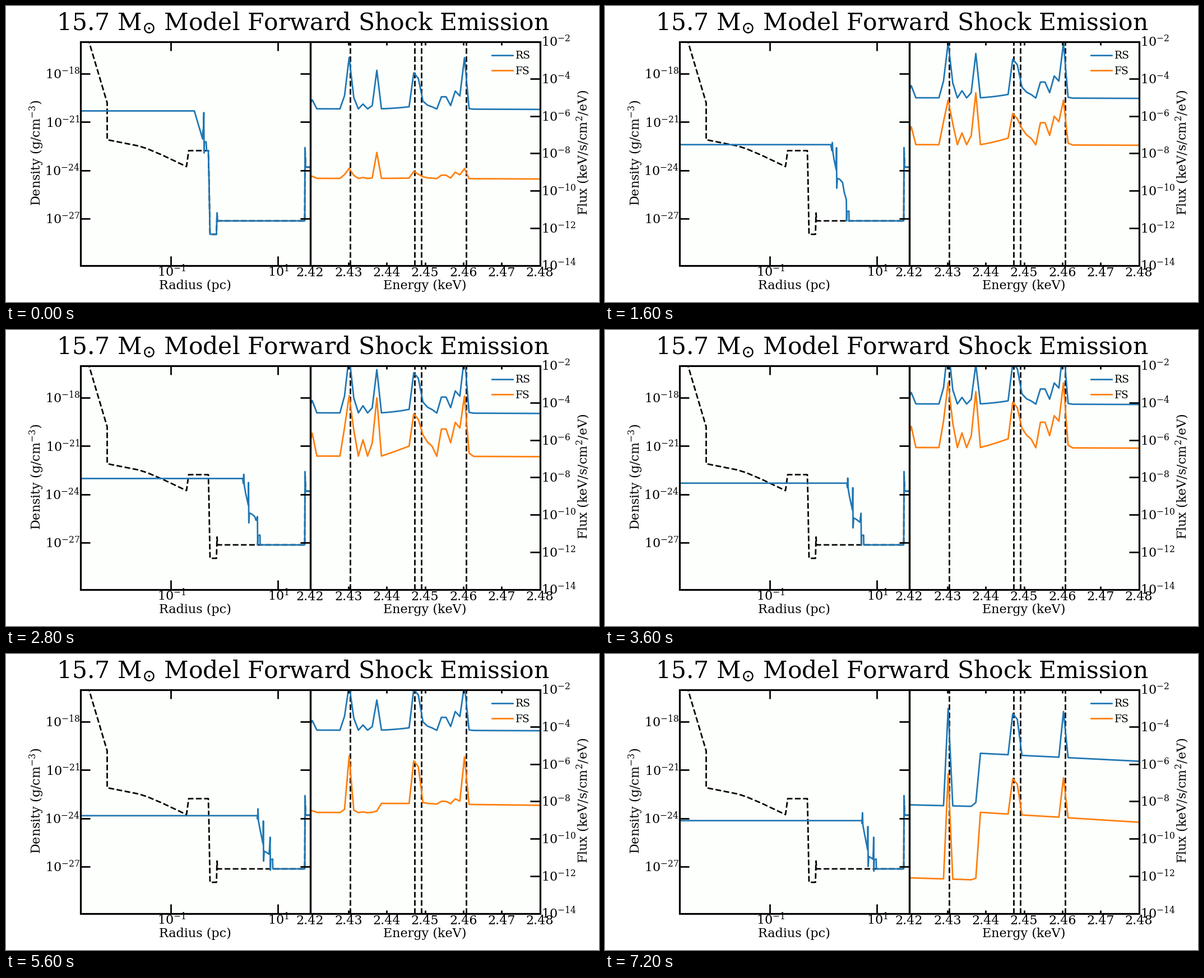
A matplotlib script for the animation above (7600 ms loop, 1058 by 529 pixels).

```python
import numpy as np
import matplotlib.pyplot as plt
from matplotlib.animation import FuncAnimation
from matplotlib.patches import Rectangle

plt.rcParams.update({"font.family": "DejaVu Serif", "mathtext.fontset": "dejavuserif"})

W, H, DPI = 1058, 529, 64
PT = 72 / DPI                       # points per pixel
FRAMES, INTERVAL = 19, 400
BLUE, ORANGE, PAPER = "#1f77b4", "#ff7f0e", "#fdfffc"
LEFT, MID, RIGHT, TOP, BOTTOM = 132.5, 542.5, 952.5, 63.5, 463.5
THIN, THICK = 2.75 * PT, 3.2 * PT
DECADE_X, DECADE_RHO, DECADE_FLUX = 95.5, 28.75, 33.3

fig = plt.figure(figsize=(W / DPI, H / DPI), dpi=DPI, facecolor="white")
ax = fig.add_axes([0, 0, 1, 1])
ax.set_xlim(0, W)
ax.set_ylim(H, 0)
ax.axis("off")


def panel(x0, x1):
    box = Rectangle((x0, TOP), x1 - x0, BOTTOM - TOP, fc=PAPER, ec="none", zorder=0)
    ax.add_patch(box)
    ax.add_patch(Rectangle((x0, TOP), x1 - x0, BOTTOM - TOP, fc="none", ec="black",
                           lw=THICK, zorder=6))
    return box


def line(x, y, color, clip=None, z=3, **kw):
    ln, = ax.plot(x, y, color=color, lw=THIN, zorder=z, **kw)
    if clip is not None:
        ln.set_clip_path(clip)
    return ln


def tick(x, y, dx, dy):
    line([x, x + dx], [y, y + dy], "black", z=5, solid_capstyle="butt")


def label(x, y, s, size=22.3, ha="center", **kw):
    return ax.text(x, y, s, fontsize=size * PT, ha=ha, va="baseline", zorder=7, **kw)


# Static parts
left_box, right_box = panel(LEFT, MID), panel(MID, RIGHT)

label(529.8, 43.3, r"15.7 M$_{\odot}$ Model Forward Shock Emission", 42.5)
label(337.3, 505.6, "Radius (pc)")
label(747.3, 505.6, "Energy (keV)")
label(62, 262, "Density (g/cm$^{-3}$)", rotation=90, rotation_mode="anchor")
label(1038, 262, "Flux (keV/s/cm$^2$/eV)", rotation=90, rotation_mode="anchor")

for i in range(4):
    y = 121 + 3 * DECADE_RHO * i
    tick(LEFT, y, 17.5, 0)
    tick(MID, y, -17.5, 0)
    label(132, y + 9.2, f"$10^{{{-18 - 3 * i}}}$", ha="right")
for e in (-1, 1):
    x = 389.7 + DECADE_X * e
    tick(x, BOTTOM, 0, -16.5)
    tick(x, TOP, 0, 16.5)
    label(x + 1, 482.6, f"$10^{{{e}}}$")
for i in range(7):
    y = TOP + 2 * DECADE_FLUX * i
    x = MID + (RIGHT - MID) * i / 6
    if 0 < i < 6:
        tick(RIGHT, y, -17.5, 0)
        tick(x, BOTTOM, 0, -6)
        tick(x, TOP, 0, 6)
    label(955, y + 9.2, f"$10^{{{-2 - 2 * i}}}$", ha="left")
    label(x, 482.6, f"{2.42 + 0.01 * i:.2f}")

for x in (613.5, 728.5, 740.5, 820.5):
    line([x, x], [BOTTOM, TOP], "black", right_box, z=2, ls="--")

# Density before the blast: wind, swept-up shell, empty bubble, outer wall
AMBIENT = np.array([
    (142, 43), (148, 63.5), (180.5, 173), (180.5, 239), (236, 250), (252, 255),
    (280, 267), (322, 287), (326, 258.5), (361, 258.5), (362, 300), (364, 408),
    (375.5, 408), (376.5, 370), (377.5, 384), (533, 384), (533.5, 253),
    (534.5, 288), (543, 288)])
line(*AMBIENT.T, "black", left_box, z=2, ls="--")


def burst(x, y):
    """Shell just after the explosion, still inside the dense surroundings."""
    steps = [(0, 0), (14.8, 50), (15.3, 35), (15.8, 47), (17, 3), (17.4, 75),
             (18, 56), (21, 55), (22, 71)]
    return np.array(steps) + (x, y)


def shell(x, y, g):
    """Shocked shell ahead of the ejecta edge (x, y); g grows from 0 to 1."""
    rev = x + 1.2 + 3.2 * (1 - g) ** 2
    contact = x + 10 + 0.9 * g
    tip = x + 28.4 - 7.2 * g ** 2
    return np.array([
        (x, y),
        (rev - 0.7, y + 13 - 8 * g),
        (rev, y - 14 * g),
        (rev + 0.8, y + 14 - 6 * g),
        (rev + 3, y + 29 - 9 * g),
        (contact - 0.5, y + 42 + 10 * g),
        (contact, y + 3.5 + 7 * g),
        (contact + 0.5, y + 76 + 6 * g),
        (contact + 1.6, y + 59 + 5 * g),
        (contact + 5.5 + g, y + 60 + 7 * g),
        (tip - 1.2 - 7.7 * (1 - g), y + 67 + 2 * g),
        (tip - 0.6 - 4.3 * (1 - g), y + 97 - 42 * g),
        (tip, max(327.5, 360 - 50 * g)),
        (tip + 0.4, 384 + 4 * g ** 4),
        (tip + 1, 367.5),
        (tip + 4.5, 366.5),
        (tip + 4.8, 384)])


def density(n):
    # Free expansion: density falls as radius cubed
    age = np.log10(n + 1)
    x, y = 336 + DECADE_X * age, 187.5 + 3 * DECADE_RHO * age
    g = np.clip(np.log(max(n + 1, 3) / 3) / np.log(19 / 3), 0, 1)
    front = burst(x, y) if n == 0 else shell(x, y, g)
    rest = AMBIENT[AMBIENT[:, 0] > front[-1, 0]]
    return np.vstack([[(LEFT, y)], front, rest]).T


# Spectra: continuum with an edge, weak lines, and four strong lines
BIN = np.arange(-1, 36)
BIN_X = 546.4 + 8.23 * BIN
EDGE = 15
WEAK = {-1: 10, 0: 44, 7: 54, 9: 50, 11: 32, 13: 26, 24: 41, 25: 28, 26: 20,
        28: 52, 29: 52, 30: 27, 31: 64, 32: 54, 34: 7}
WEAK.update({k: 3.4 * (k - EDGE) for k in range(EDGE, 22)})


def excess(height):
    return 10 ** (height / DECADE_FLUX) - 1


WEAK_FLUX = excess(np.array([WEAK.get(k, 0) for k in BIN]))


def track(*points):
    t, v = zip(*points)
    return lambda n: np.interp(n, t, v)


# base: level above the edge; drop: depth below it; strong, mid: line heights;
# weak: log of the weak lines' strength
RS = dict(
    base=track((0, 183.7), (2, 190), (3, 164), (5, 164), (9, 132), (12, 125),
               (14, 136), (18, 177.5)),
    drop=track((14, 0), (17, 82), (18, 92)),
    strong=track((0, 92), (2, 94), (5, 101), (9, 104), (14, 81), (18, 82)),
    mid=track((0, 69), (2, 70), (5, 84), (14, 54), (18, 7)),
    weak=track((0, -1), (5, -0.7), (14, -0.95), (18, -4)))
FS = dict(
    base=track((0, 308), (2, 300), (3, 255), (5, 240.5), (9, 210), (12, 246),
               (14, 267), (18, 283)),
    drop=track((12, 0), (14, 16), (17, 106), (18, 117)),
    strong=track((0, 18), (2, 40), (5, 100), (9, 116), (12, 92), (18, 71)),
    mid=track((0, 46.5), (2, 62.5), (5, 108), (9, 100), (12, 53), (14, 3)),
    weak=track((0, -1.83), (2, -1.17), (5, 0), (9, -0.2), (12, -0.9), (18, -4)))


def spectrum(n, src):
    base, drop, strong, mid, weak = (src[k](n) for k in
                                     ("base", "drop", "strong", "mid", "weak"))
    slope = 0.004 + 0.0005 * drop
    above = base + slope * (BIN_X - 670)
    below = base + drop + slope / 2 * (BIN_X - MID)
    flux = 10 ** weak * WEAK_FLUX
    pair = strong * (0.7 + 0.04 * np.clip(n - 9, 0, 5))
    for k, height in ((8, strong + drop), (14, mid), (22, pair), (33, strong)):
        flux[k + 1] = excess(height)
    flux[24] = flux[23] / 2
    y = np.where(BIN >= EDGE, above, below) - DECADE_FLUX * np.log10(1 + flux)
    return np.append(BIN_X, 960), np.append(y, base + slope * 290)


rho = line([], [], BLUE, left_box)
curves = [(line([], [], c, right_box), src) for c, src in ((BLUE, RS), (ORANGE, FS))]
legend = [(line([867.3, 903.7], [0, 0], c, z=4), label(909, 0, s, 18.6, ha="left"))
          for c, s in ((BLUE, "RS"), (ORANGE, "FS"))]


def draw(n):
    rho.set_data(*density(n))
    for ln, src in curves:
        ln.set_data(*spectrum(n, src))
    top = 409 if 10 <= n <= 13 else 88
    for i, (ln, txt) in enumerate(legend):
        y = top + 27.3 * i
        ln.set_ydata([y, y])
        txt.set_y(y + 6.5)
    return []


anim = FuncAnimation(fig, draw, frames=FRAMES, interval=INTERVAL, repeat=True)
plt.show()
```
